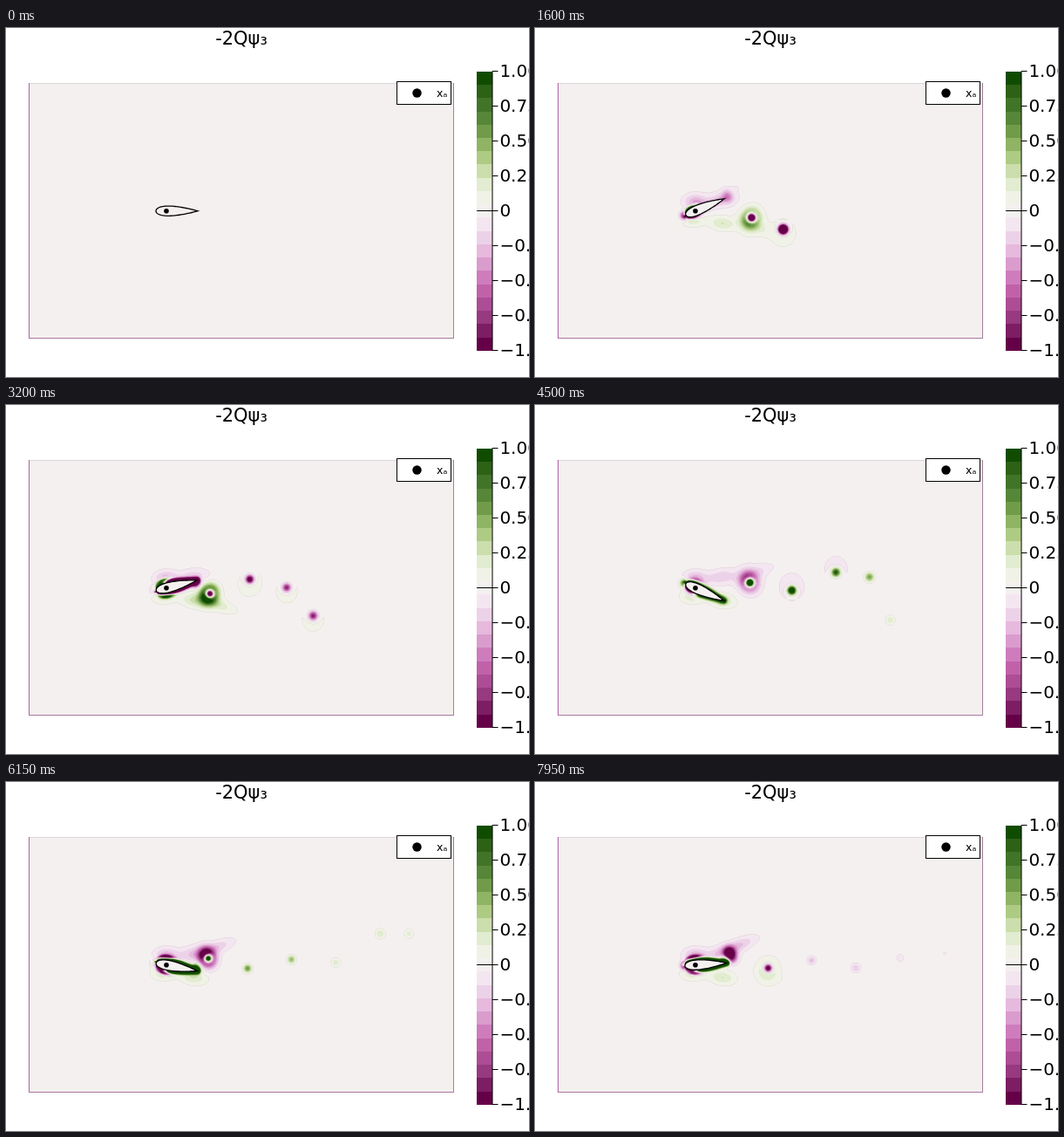
Recreate the animation shown at these times as an HTML page with a canvas. Size 600 by 400 pixels, loop 8 s.

```html
<!DOCTYPE html>
<html lang="en">
<head>
<meta charset="utf-8">
<title>Pitching foil wake</title>
<style>
  html, body { margin: 0; width: 100%; height: 100%; overflow: hidden; background: #fff; }
  svg, canvas { position: absolute; display: block; }
  svg { left: 0; top: 0; }
  canvas { left: 160px; top: 136px; width: 354px; height: 128px; }
  text { font-family: "DejaVu Sans", sans-serif; }
</style>
</head>
<body>
<svg width="600" height="400"><rect x="26" y="63" width="488" height="293" fill="#f5f0f0"/></svg>
<canvas id="field" width="708" height="256"></canvas>
<svg width="600" height="400">
  <path d="M26 63.5H514" stroke="#dcd7d9"/>
  <path d="M513.5 63V356" stroke="#a0809a"/>
  <path d="M26 355.5H514" stroke="#a87a9f"/>
  <path d="M26.5 63V356" stroke="#b063a2"/>
  <text x="270" y="18.5" font-size="21" text-anchor="middle">-2Qψ₃</text>
  <rect x="448.5" y="61.5" width="62" height="26" fill="#fff" stroke="#000"/>
  <circle cx="471.5" cy="74.5" r="5.2"/>
  <text x="494" y="79" font-size="12.5">xₐ</text>
  <g id="bar"></g>
  <g id="foil">
    <polygon id="outline" fill="#f5f0f0" stroke="#000" stroke-width="1.3"/>
  </g>
  <circle cx="184" cy="209.8" r="2.8"/>
</svg>
<script>
const LOOP = 8000, STEP = 50, HALF_PERIOD = 1000, CHORD = 48;
const LEFT = 160, TOP = 136, SCALE = 2, W = 708, H = 256;
const PIVOT = { x: 184, y: 209.7 };
const palette = ("650048 7d1d63 973a80 ad4d95 c162a9 cf7cbd da9ccd e6b9dd ecd2e8 f4e6f0 f5f0f0 " +
  "f1f2e7 e2ecd0 cbdeab aecb84 8fb464 709c4a 568738 417427 2c6116 0f4c00").split(" ");
const rgb = palette.map(c => [0, 2, 4].map(i => parseInt(c.slice(i, i + 2), 16)));

const rad = deg => deg * Math.PI / 180;
const clamp = (x, lo = 0, hi = 1) => Math.min(hi, Math.max(lo, x));
const smooth = (a, b, x) => { const k = clamp((x - a) / (b - a)); return k * k * (3 - 2 * k); };
const bell = x => Math.exp(-x * x);
const halfThickness = x => 5 * 0.235 * CHORD *
  (0.2969 * Math.sqrt(x) - 0.126 * x - 0.3516 * x ** 2 + 0.2843 * x ** 3 - 0.1036 * x ** 4);

const ctx = document.getElementById("field").getContext("2d");
const image = ctx.createImageData(W, H);
const field = new Float32Array(W * H);
const bands = new Uint8Array(W * H);

function addOver(x0, y0, x1, y1, value) {
  const left = Math.max(0, Math.floor((x0 - LEFT) * SCALE)), right = Math.min(W, (x1 - LEFT) * SCALE);
  const top = Math.max(0, Math.floor((y0 - TOP) * SCALE)), bottom = Math.min(H, (y1 - TOP) * SCALE);
  for (let j = top; j < bottom; j++)
    for (let i = left; i < right; i++)
      field[j * W + i] += value(LEFT + (i + 0.5) / SCALE, TOP + (j + 0.5) / SCALE);
}

function blob(amp, x, y, sx, sy = sx, angle = 0) {
  const c = Math.cos(rad(angle)), s = Math.sin(rad(angle)), reach = 3.2 * Math.max(sx, sy);
  addOver(x - reach, y - reach, x + reach, y + reach, (px, py) => {
    const dx = px - x, dy = py - y;
    const a = (dx * c + dy * s) / sx, b = (dy * c - dx * s) / sy;
    return amp * Math.exp(-(a * a + b * b) / 2);
  });
}

function addBody(phase, pitch, gain) {
  const c = Math.cos(pitch), s = Math.sin(pitch);
  const layer = 3 * gain * Math.cos(phase - rad(20));
  const crescent = -1.2 * gain * Math.cos(phase - rad(15));
  addOver(160, 180, 236, 240, (px, py) => {
    const dx = px - PIVOT.x, dy = py - PIVOT.y;
    const u = dx * c + dy * s + CHORD / 4, v = dy * c - dx * s;
    const x = clamp(u / CHORD);
    const d = Math.hypot(Math.max(0, -u, u - CHORD), Math.max(0, Math.abs(v) - halfThickness(x)));
    if (d > 12) return 0;
    const aft = smooth(0.12, 0.45, x);
    return layer * aft * bell(d / 2.8)
      - 1.6 * gain * Math.tanh(v / 2) * (1 - aft) * bell(d / 2.4)
      + crescent * bell((d - 4) / 2.2) * bell((x - 0.22) / 0.2);
  });
  const at = (u, v) => [PIVOT.x + u * c - v * s, PIVOT.y + u * s + v * c];
  blob(layer * 0.4, ...at(34, -3 * Math.cos(phase)), 3.4);
  blob(gain * Math.sin(phase), ...at(-14, 0), 3.2);

  // Steady halos: suction side above, pressure side below.
  blob(-0.32 * gain, 184, 199, 9, 6);
  blob(0.24 * gain, 181, 219, 9, 5.5);
  blob(-0.22 * gain, 214, 197, 12, 6, -8);
  blob(0.24 * gain, 215, 224, 10, 5.5, 8);
}

// One vortex is shed per half stroke: odd ones below the tail, even ones above.
// The starting vortex (index 0) sinks; the next few are lifted as they drift away.
function vortexAt(index, age) {
  const side = index % 2 ? 1 : -1;
  const speed = 0.051 - 0.0085 * Math.max(0, 1 - 0.6 * index);
  const x = 222 + speed * age - 12 * (1 - Math.exp(-age / 500));
  if (!index) return { x, y: 253 - 46 * Math.exp(-age / 2400), side };
  const lift = 1.6e-6 / (1 + ((index - 1.5) / 1.4) ** 4);
  const offset = 3.5 + 5.5 / index + 9 * Math.exp(-age / 250);
  return { x, y: 209 + side * offset - lift * age * age, side };
}

function addVortex(index, t, pitch) {
  const age = t - (index * HALF_PERIOD - 150);
  const fade = clamp((age + 300) / 300);
  if (!fade) return;
  const { x, y, side } = vortexAt(index, Math.max(0, age));
  const dx = x - PIVOT.x, dy = y - PIVOT.y, r = Math.hypot(dx, dy);

  if (index && x < 290) {
    const ring = side * 2 * fade * bell((x - 222) / 29);
    const size = 4 + 2.5 * smooth(222, 236, x);
    blob(ring, x - 1, y + side, size, size + 1, side * 25);
    blob(ring * 0.13, x + 7, y + side * 11, 15, 5, side * 22);
  }
  // The weight follows the vortex's height over the chord line.
  const strength = 6 * Math.sin(pitch - rad(3.5) - Math.atan2(dy, dx)) * (100 / r) ** 2;
  const core = clamp(strength, -3.2, 3.2) * smooth(222, 232, x) * fade;
  blob(core, x, y, 3.3 + 0.7 * smooth(250, 420, x));
  if (x > 240) blob(clamp(-0.11 * core, -0.14, 0.14), x, y - 4 * Math.sign(core), 10, 11);
}

function paint() {
  for (let k = 0; k < field.length; k++)
    bands[k] = clamp(Math.round(field[k] * 10.5), -10, 10) + 10;
  for (let k = 0; k < field.length; k++) {
    const band = bands[k], color = rgb[band];
    const edge = (band === 9 || band === 11) &&
      (bands[k - 1] === 10 || bands[k + 1] === 10 || bands[k - W] === 10 || bands[k + W] === 10);
    const shade = edge ? 0.9 : 1;
    for (let i = 0; i < 3; i++) image.data[4 * k + i] = color[i] * shade;
    image.data[4 * k + 3] = band === 10 ? 0 : 255;
  }
  ctx.putImageData(image, 0, 0);
}

function draw(t) {
  const phase = Math.PI * t / HALF_PERIOD, pitch = rad(24) * Math.sin(phase);
  field.fill(0);
  if (t > 0) {
    addBody(phase, pitch, clamp(t / 250));
    for (let i = 0; i <= LOOP / HALF_PERIOD; i++) addVortex(i, t, pitch);
  }
  paint();
  document.getElementById("foil").setAttribute("transform",
    `translate(${PIVOT.x} ${PIVOT.y}) rotate(${pitch * 180 / Math.PI})`);
}

function buildStatic() {
  const upper = [], lower = [];
  for (let i = 0; i <= 40; i++) {
    const x = (i / 40) ** 2, u = (x - 0.25) * CHORD, h = halfThickness(x);
    upper.push(`${u},${-h}`);
    lower.unshift(`${u},${h}`);
  }
  document.getElementById("outline").setAttribute("points", [...upper, ...lower].join(" "));

  const height = 320 / palette.length;
  let bar = palette.map((c, i) =>
    `<rect x="540" y="${369.5 - (i + 1) * height}" width="18" height="${height + 0.3}" fill="#${c}" shape-rendering="crispEdges"/>`).join("");
  bar += '<path d="M558 49.5V369.5M540 209.5H558" stroke="#000"/>';
  for (let i = 0; i <= 8; i++) {
    const y = 49.5 + 40 * i, value = 1 - i / 4;
    const label = value ? value.toFixed(2).replace("-", "−") : "0";
    bar += `<path d="M558 ${y}H564.5" stroke="#000"/><text x="566.4" y="${y + 6}" font-size="20">${label}</text>`;
  }
  document.getElementById("bar").innerHTML = bar;
}

let shown = -1;
const start = performance.now();
function tick() {
  const t = Math.floor((performance.now() - start) % LOOP / STEP) * STEP;
  if (t !== shown) draw(shown = t);
  requestAnimationFrame(tick);
}
buildStatic();
tick();
</script>
</body>
</html>
```
